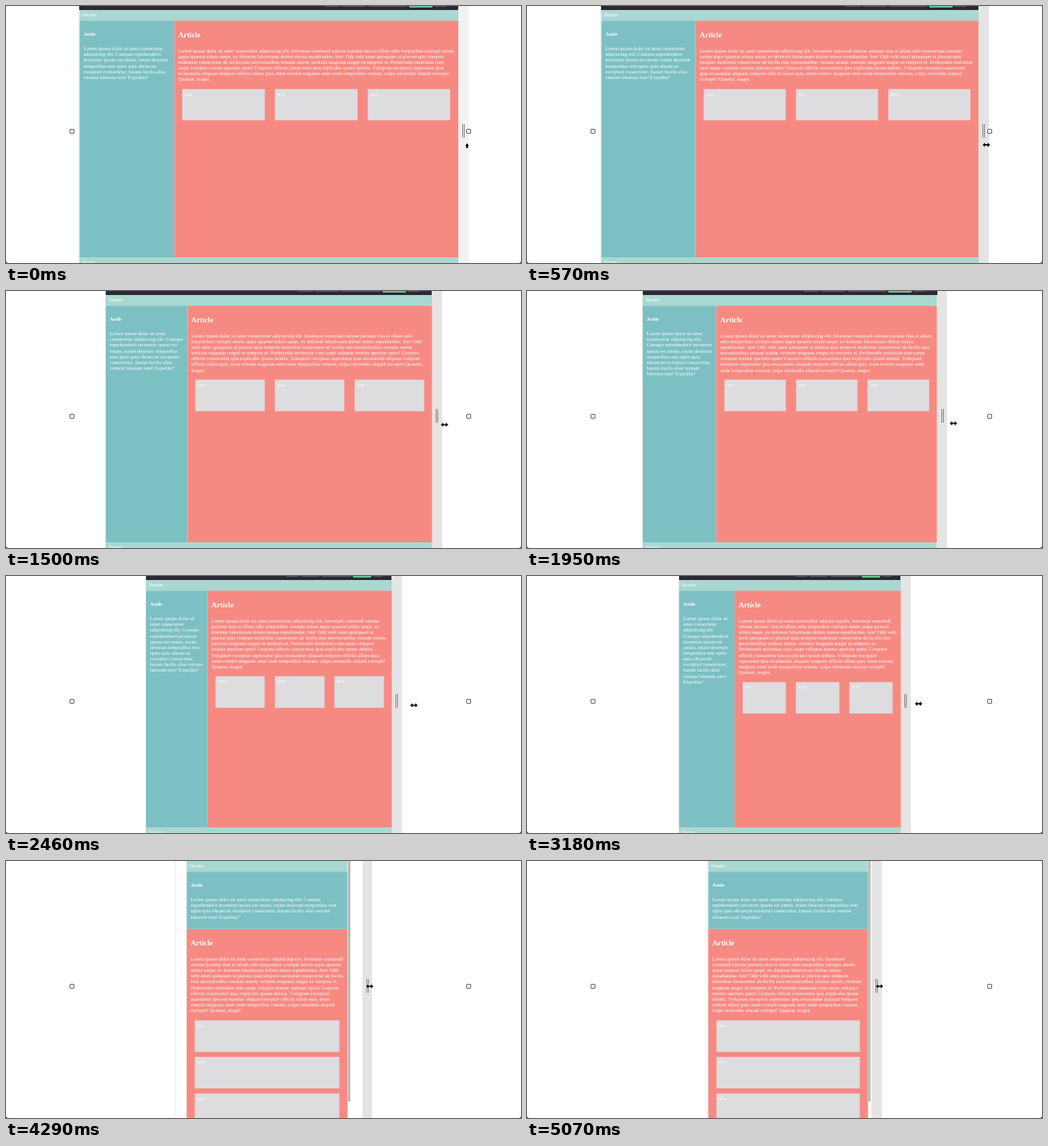
Write an HTML page that moves like this. It is 640 by 320 pixels and loops after 5.1 s.

```html
<!DOCTYPE html>
<html lang="en">
<head>
<meta charset="utf-8">
<title>Responsive layout</title>
<style>
html, body { margin: 0; width: 100%; height: 100%; overflow: hidden; background: #333; }
#stage { position: relative; width: 640px; height: 320px; overflow: hidden; background: #fff; border-radius: 0 0 3px 3px; }
#stage > * { position: absolute; }
#frame { top: -4px; height: 330px; background: #fff; box-shadow: 0 0 2px #0003; }
#strip { top: 0; width: 12.5px; height: 320px; }
#strip::after { content: ""; position: absolute; left: 5px; top: 147px; width: 1px; height: 17px; border: solid #858585; border-width: 0 1px; }
#bar { top: 0; height: 5px; background: #2c2935; overflow: hidden; }
#bar i { position: absolute; top: 0; height: 1.2px; background: #5b5965; border-radius: 0 0 1px 1px; }
#bar i.go { height: 2px; background: #62c583; }
#thumb { top: 0; width: 2.5px; background: #bbb; border-radius: 0 0 2px 2px; }
.knob { box-sizing: border-box; top: 152.5px; width: 6px; height: 6px; border: 1px solid #666; border-radius: 1px; background: #fff; }
#cursor { left: 0; top: 0; overflow: visible; }
#cursor path { stroke: #fff; stroke-width: .8; paint-order: stroke; }

#page {
  left: 0; transform-origin: 0 0; color: #fff;
  font: 16px/18.4px "Liberation Serif", Times, serif;
  font-kerning: none; text-rendering: geometricPrecision;
  display: grid; grid-template: auto 757.5px auto / 1fr 3fr;
}
header, footer { grid-column: 1 / -1; padding: 8px 9px; background: #a9d8d1; }
aside, article { padding: 12.8px; min-width: 0; }
aside { background: #7cc0c4; }
article { background: #f68a83; }
h2 { font-size: 24px; line-height: 27.6px; margin: 19.92px 0; }
h4 { font-size: 16px; margin: 21.28px 0; }
p { margin: 0 0 16px; padding-top: 7.5px; }
.cards { display: grid; grid-template-columns: repeat(3, 1fr); gap: 32.5px; margin-top: 20.4px; padding: 0 12.8px 12.8px; }
.cards div { box-sizing: border-box; height: 100.5px; padding: 8px; background: #dddcdf; }
.narrow { grid-template: none / 1fr !important; }
.narrow .cards { grid-template-columns: 1fr; gap: 16.3px; }
</style>
</head>
<body>
<div id="stage">
  <div id="frame"></div>
  <div id="strip"></div>
  <div id="page">
    <header>Header</header>
    <aside>
      <h4>Aside</h4>
      <p>Lorem ipsum dolor sit amet consectetur adipisicing elit. Cumque reprehenderit inventore ipsum est omnis, totam deserunt temporibus rem optio quia obcaecati excepturi consectetur, harum facilis alias veniam laborum iure! Expedita?</p>
    </aside>
    <article>
      <h2>Article</h2>
      <p>Lorem ipsum dolor sit amet consectetur adipisicing elit. Inventore commodi ratione pariatur eius et ullam odio temporibus corrupti autem atque quaerat soluta saepe, ex dolorem laboriosam dolore minus repudiandae. Iste! Odit velit amet quisquam ut placeat quia tempore molestiae consectetur ab facilis eius necessitatibus veniam autem, veritatis magnam magni ea tempora et. Perferendis molestiae cum saepe voluptas tenetur aperiam optio! Corporis officiis consectetur ipsa explicabo ipsum debitis. Voluptate excepturi aspernatur ipsa recusandae aliquam tempore officiis ullam quis, enim eveniet magnam amet unde temporibus veniam, culpa reiciendis aliquid corrupti! Quaerat, magni.</p>
      <div class="cards"><div>text</div><div>text</div><div>text</div></div>
    </article>
    <footer>Footer</footer>
  </div>
  <div id="bar"></div>
  <div id="thumb"></div>
  <div class="knob" style="left:79px"></div>
  <div class="knob" style="left:571.5px"></div>
  <svg id="cursor" width="1" height="1">
    <path id="point" d="M0-3.2L2.3.2L1 .6V3H-1V.6L-2.3.2Z"/>
    <path id="resize" d="M-4.6 0L-1.6-2.8V-.8H1.6V-2.8L4.6 0L1.6 2.8V.8H-1.6V2.8Z"/>
  </svg>
</div>
<script>
const LOOP = 5100, SCALE = .389, MID = 326.75, SCROLLBAR = 4.7, BREAKPOINT = 700;
const $ = id => document.getElementById(id);
const [frame, strip, page, bar, thumb, cursor, point, resize] =
  ["frame", "strip", "page", "bar", "thumb", "cursor", "point", "resize"].map($);

// [time, value...] keys; the page runs ahead of the device frame near the end
const dragKeys = [[0, 562.1], [540, 562.1], [930, 549.5], [1080, 546], [1500, 529.5], [1620, 525], [2160, 500],
  [2460, 479.5], [2700, 472], [3240, 463.5], [3630, 452], [3780, 451]];
const frameKeys = [...dragKeys, [4290, 443], [4320, 442.6], [4860, 429.5], [5070, 428.2]];
const pageKeys = [...dragKeys, [4290, 429], [4860, 428.2]];
const cursorKeys = [[0, 573, 174], [540, 571, 173], [930, 568.5, 171.5], [1080, 564, 170], [1500, 545, 166.5],
  [2160, 523, 164], [2460, 507, 161], [2700, 500, 160], [3240, 485, 159], [3630, 470, 158],
  [3780, 466, 157], [4290, 452, 156], [4860, 440, 156], [5070, 438, 156]];

function at(keys, t, n = 1) {
  const i = keys.findIndex(k => k[0] > t);
  if (i < 0) return keys[keys.length - 1][n];
  const a = keys[i - 1], b = keys[i];
  return a[n] + (b[n] - a[n]) * (t - a[0]) / (b[0] - a[0]);
}

// toolbar buttons: distance from the right edge, width
const buttons = [[166, 19], [144, 29], [111, 47], [61, 29], [29, 14]].map(([right, width], i) => {
  const el = bar.appendChild(document.createElement("i"));
  if (i === 3) el.className = "go";
  return { el, right, width };
});

function place(el, left, width) {
  el.style.left = left + "px";
  el.style.width = width + "px";
}

function draw(t) {
  const right = at(pageKeys, t), left = 2 * MID - right, width = right - left;
  const edge = at(frameKeys, t), frameLeft = t < 4310 ? 2 * MID - edge : left;
  const narrow = width / SCALE < BREAKPOINT;
  const inner = narrow ? width - SCROLLBAR : width;

  place(frame, frameLeft, edge - frameLeft);
  strip.style.left = edge + "px";
  strip.style.background = t < 500 ? "#f2f2f2" : "#e4e4e4";

  page.className = narrow ? "narrow" : "";
  page.style.width = inner / SCALE + "px";
  page.style.transform = `translate(${left}px, ${narrow ? 0 : 5}px) scale(${SCALE})`;

  bar.style.display = narrow ? "none" : "";
  place(bar, left, width);
  const fit = width < 350 ? .79 : 1;
  for (const b of buttons) place(b.el, width - b.right * fit, b.width * fit);

  thumb.style.display = narrow ? "" : "none";
  thumb.style.left = left + inner + .8 + "px";
  if (narrow) thumb.style.height = 105600 / (page.offsetHeight * SCALE) + "px";

  cursor.style.transform = `translate(${at(cursorKeys, t)}px, ${at(cursorKeys, t, 2)}px)`;
  point.style.display = t < 300 ? "" : "none";
  resize.style.display = t < 300 ? "none" : "";
}

const start = performance.now();
function tick() {
  draw((performance.now() - start) % LOOP);
  requestAnimationFrame(tick);
}
tick();
</script>
</body>
</html>
```
